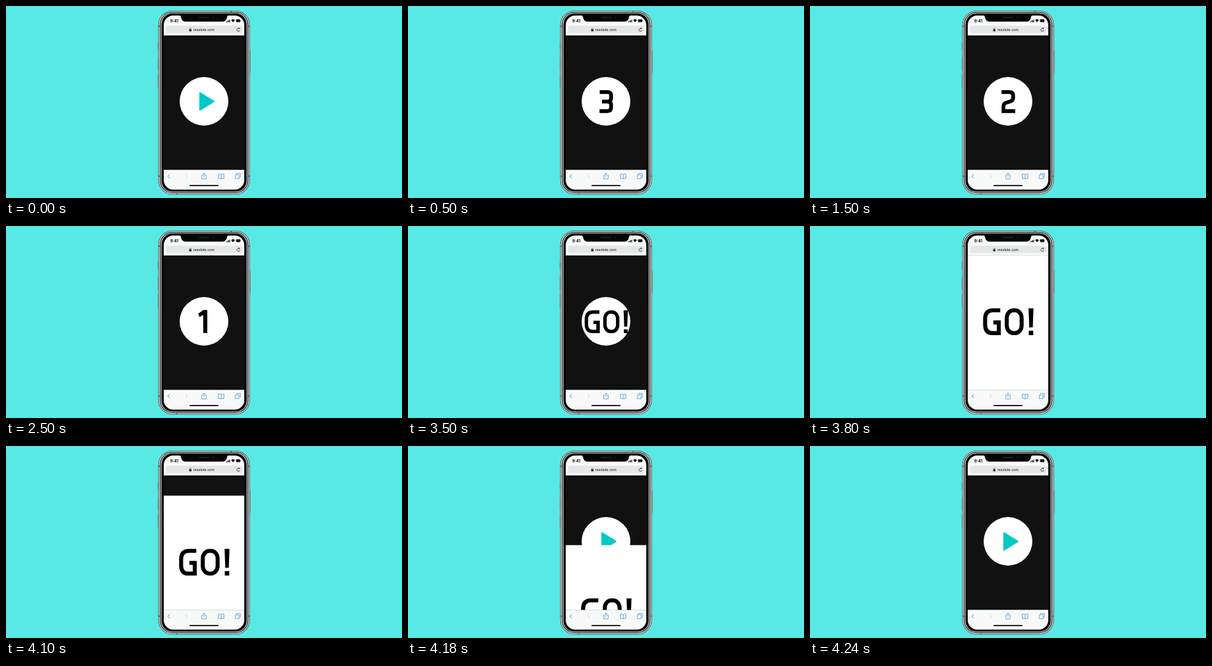
An HTML page with a canvas for the animation above (4740 ms loop, 600x292 px).

```html
<!DOCTYPE html>
<html lang="en">
<head>
<meta charset="utf-8">
<title>Countdown on a phone</title>
<style>
  html, body { margin: 0; width: 100%; height: 100%; overflow: hidden; background: #59e9e4; }
  canvas { display: block; width: 600px; height: 292px; }
</style>
</head>
<body>
<canvas id="stage" role="img" aria-label="A phone counting 3, 2, 1, GO!">3 2 1 GO!</canvas>
<script>
const LOOP = 4740, STEP = 20;
const W = 600, H = 292;
const VIEW = { x: 239, y: 44.4, w: 122, h: 205 };
const CX = 300, CY = 145, RADIUS = 36.9;
const FONT = 'Inter, "Liberation Sans", sans-serif';
const BLUE = '#3f93d2';

const canvas = document.getElementById('stage');
const ctx = canvas.getContext('2d');
const ratio = window.devicePixelRatio || 1;
canvas.width = Math.round(W * ratio);
canvas.height = Math.round(H * ratio);
ctx.scale(ratio, ratio);

function box(x, y, w, h, r, color) {
  ctx.fillStyle = color;
  ctx.beginPath();
  ctx.roundRect(x, y, w, h, r);
  ctx.fill();
}

function disc(x, y, r, color) {
  ctx.fillStyle = color;
  ctx.beginPath();
  ctx.arc(x, y, r, 0, Math.PI * 2);
  ctx.fill();
}

function line(d, color, width) {
  ctx.strokeStyle = color;
  ctx.lineWidth = width;
  ctx.stroke(new Path2D(d));
}

function shape(d, color) {
  ctx.fillStyle = color;
  ctx.fill(new Path2D(d));
}

function label(text, x, y, size, weight, color) {
  ctx.font = `${weight} ${size}px ${FONT}`;
  ctx.fillStyle = color;
  ctx.fillText(text, x, y);
}

// Square display lettering, relative to the middle of the circle
const glyphs = {
  3() {
    line('M-9.5 -14.2H2Q7.7 -14.2 7.7 -9V-4.5Q7.7 .3 2 .3H-6M2 .3Q7.7 .3 7.7 5.2V9.6Q7.7 14.8 2 14.8H-9.8', '#000', 5.7);
  },
  2() {
    line('M-9.8 -14.2H2Q7.8 -14.2 7.8 -8.6V-5.5Q7.8 -1.2 3.8 0L-3.2 2.2Q-6.8 3.4 -6.8 7V14.8H11', '#000', 5.7);
  },
  1() {
    shape('M-8.8 -11.8L-.8 -17.2H5V17.8H-1.2V-9.8L-6.8 -6.4Z', '#000');
  },
  go() {
    line('M-10 -14.8H-19.5Q-29.7 -14.8 -29.7 -4V4Q-29.7 14.8 -20.5 14.8H-12V.9H-19', '#000', 5.2);
    ctx.beginPath();
    ctx.roundRect(-1.6, -14.8, 19.3, 29.6, { x: 8.5, y: 10 });
    ctx.stroke();
    shape('M26.7 -17.4H33.1L32.2 7.4H27.6Z M27 11.6H32.8V17.4H27Z', '#000');
  }
};

function write(name, x, y, scale = 1) {
  ctx.save();
  ctx.translate(x, y);
  ctx.scale(scale, scale);
  glyphs[name]();
  ctx.restore();
}

function drawButtons() {
  const parts = [[229.8, 55, 11], [229.8, 78, 20], [229.8, 104, 20], [369.2, 68, 34]];
  for (const [x, y, h] of parts) box(x, y, 1.4, h, .6, '#81979a');
}

function drawBody() {
  const rings = [[0, '#3c4244'], [.9, '#e9ebec'], [2.3, '#1c1e1f'], [3.6, '#e2e4e5'], [4.8, '#050505']];
  drawButtons();
  for (const [d, color] of rings) {
    box(230.7 + d, 7 + d * .9, 138.8 - d * 2, 279.6 - d * 1.8, 21.5 - d, color);
  }
  for (const y of [30, 258]) {
    box(230.7, y, 2.3, 1.5, 0, '#5d6568');
    box(367.2, y, 2.3, 1.5, 0, '#5d6568');
  }
  box(340.5, 7, 1.5, 2, 0, '#5d6568');
  box(258, 284.6, 1.5, 2, 0, '#5d6568');
  box(239, 14.4, 122, 264.8, 14.5, '#f8f9f9');
}

function drawStatus() {
  shape('M262.5 13.5H337.5Q335.2 14.8 334.8 17.2Q333.8 23.8 327.5 23.8H272.5Q266.2 23.8 265.2 17.2Q264.8 14.8 262.5 13.5Z', '#050505');
  box(292, 16.8, 16, 1.5, .7, '#25282b');
  disc(314.5, 17.5, 1.1, '#1a2530');
  label('9:41', 248.8, 24.8, 6, 700, '#111');
  for (let i = 0; i < 4; i++) box(334 + i * 1.5, 23.1 - i * .75, 1, 1.6 + i * .75, .2, '#111');
  shape('M341 21.6Q344 18.6 347 21.6L344 24.8Z', '#111');
  box(348.5, 20.2, 6.5, 4.2, 1, '#111');
  box(355.4, 21.5, .6, 1.6, .2, '#555');
}

function drawAddress() {
  box(242.5, 30, 115.5, 11.2, 3, '#e5e6e8');
  box(277.5, 35.6, 3.5, 2.8, .4, '#222');
  line('M278.2 35.8V34.9Q278.2 33.8 279.25 33.8Q280.3 33.8 280.3 34.9V35.8', '#222', .6);
  label('resolute.com', 283.9, 37.9, 5.1, 500, '#1c1c1c');
  line('M353.5 34.7A2.2 2.2 0 1 0 354.2 36.5', '#222', .75);
  shape('M351.9 33.1L354.3 33.2L353.8 35.3Z', '#222');
}

function drawToolbar() {
  box(239, 249.4, 122, .5, 0, '#d5d8d9');
  line('M248.1 255.9L245.2 258.9L248.1 261.9', BLUE, 1);
  line('M272 255.9L274.9 258.9L272 261.9', '#c8cccf', .9);
  line('M298.4 257.2H296.7V263.1H303.3V257.2H301.6M300 260.2V254.2M298.3 255.8L300 254.1L301.7 255.8', BLUE, .8);
  line('M326 256.5Q324 255 321.9 255.8V262.4Q324 261.7 326 263Q328 261.7 330.1 262.4V255.8Q328 255 326 256.5V263', BLUE, .8);
  line('M347.4 256.8H353.1V262.7H347.4ZM349.4 256.6V254.6H355.2V260.6H353.3', BLUE, .75);
  box(278, 272.3, 44, 1.7, .85, '#080808');
}

function drawPlay() {
  disc(CX, CY, RADIUS, '#fff');
  ctx.lineJoin = 'round';
  const triangle = 'M293.9 132.2L314.8 145.1L293.9 158.1Z';
  shape(triangle, '#00c9c5');
  line(triangle, '#00c9c5', 2);
  ctx.lineJoin = 'miter';
}

function drawCount(name) {
  disc(CX, CY, RADIUS, '#fff');
  write(name, CX, CY);
}

function drawGo(scale, drop = 0) {
  write('go', CX, CY + .6 + drop, scale);
}

function drawGrow(t) {
  const k = Math.min(15, Math.floor((t - 3500) / STEP));
  disc(CX, CY, RADIUS + 7.4 * k, '#fff');
  drawGo(1 + .0111 * k);
}

function drawSlide(t) {
  const k = Math.floor((t - 3980) / STEP);
  const drop = VIEW.h * Math.pow((k + 1) / 14, 2.72);
  drawPlay();
  box(VIEW.x, VIEW.y + drop, VIEW.w, VIEW.h, 0, '#fff');
  drawGo(1.167, drop);
}

function drawPage(t) {
  ctx.save();
  ctx.beginPath();
  ctx.rect(VIEW.x, VIEW.y, VIEW.w, VIEW.h);
  ctx.clip();
  box(VIEW.x, VIEW.y, VIEW.w, VIEW.h, 0, '#111');
  if (t < 500 || t >= 4240) drawPlay();
  else if (t < 1500) drawCount(3);
  else if (t < 2500) drawCount(2);
  else if (t < 3500) drawCount(1);
  else if (t < 3980) drawGrow(t);
  else drawSlide(t);
  ctx.restore();
}

function draw(t) {
  box(0, 0, W, H, 0, '#59e9e4');
  drawBody();
  drawStatus();
  drawAddress();
  drawPage(t);
  drawToolbar();
}

const start = performance.now();
function tick() {
  draw((performance.now() - start) % LOOP);
  requestAnimationFrame(tick);
}
tick();
</script>
</body>
</html>
```
